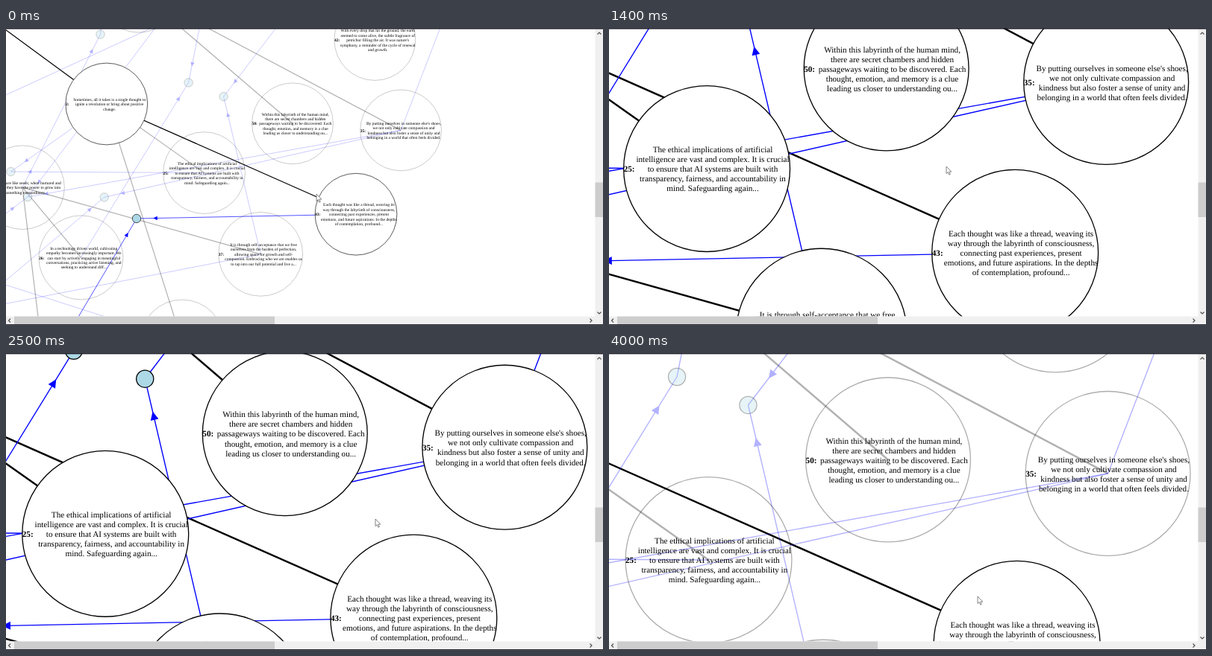
These frames come from a looping animation (800 px wide and 399 px high, 4100 ms). An HTML page:

```html
<!DOCTYPE html>
<html lang="en">
<head>
<meta charset="utf-8">
<title>Thought map</title>
<style>
  html, body { margin: 0; width: 100%; height: 100%; overflow: hidden; background: #fff; }
  svg { display: block; width: 800px; height: 399px; }
  text { font: 5.5px "Liberation Serif", "Times New Roman", serif; text-rendering: geometricPrecision; text-anchor: middle; }
  .label { font-weight: bold; text-anchor: start; }
  .tree { stroke: #000; stroke-width: 1.2; }
  .link { stroke: #00f; stroke-width: .68; fill: #00f; }
  .link polygon { stroke: none; }
  .big { fill: #fff; stroke: #000; stroke-width: .65; }
  .hub { fill: lightblue; stroke: #000; stroke-width: .65; }
  .dim .tree:not(.hot), .dim .link:not(.hot), .dim .hub:not(.hot) { opacity: .3; }
  .dim .big:not(.hot) { fill-opacity: 0; stroke-opacity: .32; }
</style>
</head>
<body>
<svg viewBox="0 0 800 399">
  <defs><clipPath id="view"><rect width="789.5" height="386.5" y="1"/></clipPath></defs>
  <rect width="800" height="399" fill="#fff"/>
  <g clip-path="url(#view)">
    <g id="world"><g id="edges"></g><g id="hubs"></g><g id="nodes"></g></g>
  </g>
  <g id="chrome">
    <path fill="#f0f0f0" d="M789.5 1H800V398H0V387.5H789.5Z"/>
    <path fill="#cdcdcd" d="M789.5 207.5H800V254H789.5ZM11 387.5H360V398H11Z"/>
    <path fill="none" stroke="#505050" stroke-width="1.2"
      d="M792.5 8.5l2.5-2.5 2.5 2.5M792.5 381.5l2.5 2.5 2.5-2.5M6 390.5l-2.5 2.5 2.5 2.5M782.5 390.5l2.5 2.5-2.5 2.5"/>
    <path fill="#25232d" d="M0 0H800V1.5H0ZM0 398H800V399H0Z"/>
  </g>
  <path id="cursor" d="M0 0V9.6L2.2 7.6 3.8 11.2 5.3 10.5 3.8 7.1H6.8Z" fill="#fff" stroke="#666" stroke-width=".8"/>
</svg>
<script>
const NS = 'http://www.w3.org/2000/svg';
const $ = id => document.getElementById(id);

function add(parent, tag, attrs, text) {
  const el = document.createElementNS(NS, tag);
  for (const k in attrs) el.setAttribute(k, attrs[k]);
  if (text) el.textContent = text;
  parent.append(el);
  return el;
}

// Big nodes: x, y, radius, text lines
const nodes = {
  2: [134.8, 102, 54.9, 'Sometimes, all it takes is a single thought to|ignite a revolution or bring about positive|change.'],
  7: [22, 214.2, 56.3, 'Thoughts are like seeds; when nurtured and|cared for, they have the power to grow into|something extraordinary.'],
  14: [178, -49, 55, ''],
  28: [236, 421, 56, ''],
  42: [494.3, 16, 54.4, "With every drop that hit the ground, the earth|seemed to come alive, the subtle fragrance of|petrichor filling the air. It was nature's|symphony, a reminder of the cycle of renewal|and growth."],
  25: [265.5, 194.6, 54.9, 'The ethical implications of artificial|intelligence are vast and complex. It is crucial|to ensure that AI systems are built with|transparency, fairness, and accountability in|mind. Safeguarding again...'],
  26: [100.4, 308.4, 56.5, 'In a technology driven world, cultivating|empathy becomes increasingly important. We|can start by actively engaging in meaningful|conversations, practicing active listening, and|seeking to understand diff...'],
  35: [529.1, 137.4, 54.4, "By putting ourselves in someone else's shoes,|we not only cultivate compassion and|kindness but also foster a sense of unity and|belonging in a world that often feels divided."],
  37: [341.2, 303.8, 56.4, 'It is through self-acceptance that we free|ourselves from the burden of perfection,|allowing space for growth and self-|compassion. Embracing who we are enables us|to tap into our full potential and live a...'],
  43: [469, 250.2, 54.9, 'Each thought was like a thread, weaving its|way through the labyrinth of consciousness,|connecting past experiences, present|emotions, and future aspirations. In the depths|of contemplation, profound...'],
  50: [384, 128.3, 54.4, 'Within this labyrinth of the human mind,|there are secret chambers and hidden|passageways waiting to be discovered. Each|thought, emotion, and memory is a clue|leading us closer to understanding ou...']
};

const hubs = {
  A: [175, 256], B: [131.7, 227.4], C: [244.6, 73.4], D: [291.6, 92.1],
  E: [126.5, 8.5], F: [29, 227], G: [6.5, 193]
};

// Edges join node keys or loose points outside the view
const tree = [
  [[-100, -71], 2, 'hot'], [2, 43, 'hot'], [2, 25], [2, 28], [7, 37], [7, 26],
  [7, [50, 446]], [14, 50], [14, 35]
];
const links = [
  [43, 'A', 'hot'], [[40, 484.5], 'A', 'hot'], [26, 'C'], [[280, -105], 'C'],
  [37, 'D'], [[400, -50], 'D'], [35, 'B'], [35, 'F'], [25, 'G'], [2, 'G'],
  [7, 'E'], [[133, -60], 'E'], [[230, -40], 'F'], [[-60, 295], 'F'], [[-40, 373], 'B'],
  [[-60, 117.6], [260, -30]], [35, [601, -50]], [37, [-60, 382]], [28, [-60, 326]]
];

const at = p => Array.isArray(p) ? p : nodes[p] || hubs[p];

function edge([from, to, hot = ''], kind) {
  const [x1, y1] = at(from), [x2, y2] = at(to);
  const g = add($('edges'), 'g', { class: `${kind} ${hot}` });
  add(g, 'line', { x1, y1, x2, y2 });
  if (kind === 'link' && to in hubs) {
    const a = Math.atan2(y2 - y1, x2 - x1);
    add(g, 'polygon', {
      points: '2.8,0 -2.8,2.7 -2.8,-2.7',
      transform: `translate(${x2 - 25 * Math.cos(a)} ${y2 - 25 * Math.sin(a)}) rotate(${a * 180 / Math.PI})`
    });
  }
}

tree.forEach(e => edge(e, 'tree'));
links.forEach(e => edge(e, 'link'));

for (const k in hubs) {
  const [cx, cy] = hubs[k];
  add($('hubs'), 'circle', { cx, cy, r: 5.7, class: k === 'A' ? 'hub hot' : 'hub' });
}

for (const k in nodes) {
  const [cx, cy, r, body] = nodes[k];
  add($('nodes'), 'circle', { cx, cy, r, class: k === '2' || k === '43' ? 'big hot' : 'big' });
  if (!body) continue;
  const base = cy + 2.1, lines = body.split('|');
  add($('nodes'), 'text', { x: cx - r, y: base, class: 'label' }, k + ':');
  lines.forEach((line, i) =>
    add($('nodes'), 'text', { x: cx + 3.9, y: base + (i - (lines.length - 1) / 2) * 6.45 }, line));
}

// Tracks: time followed by values
const LOOP = 4100, STEP = 100, FOCUS = [396, 200];
const zoomTrack = [[600, 0], [700, .0667], [1200, .708]];
const panTrack = [[1700, 0, 0], [2300, 3.4, 37.5], [2700, .9, 70], [3000, 2.4, 89]];
const cursorTrack = [
  [0, 416, 223], [600, 396, 200], [1200, 396, 200], [1400, 452, 186], [1700, 493, 170],
  [2300, 496, 207], [2700, 494, 239], [3000, 495, 256], [3100, 495, 252], [4000, 494, 327]
];

function sample(track, t) {
  const i = track.findIndex(k => k[0] > t);
  if (i === 0) return track[0].slice(1);
  if (i < 0) return track[track.length - 1].slice(1);
  const a = track[i - 1], b = track[i], u = (t - a[0]) / (b[0] - a[0]);
  return a.slice(1).map((v, j) => v + (b[j + 1] - v) * u);
}

function draw(t) {
  const s = Math.exp(sample(zoomTrack, t)[0]);
  const [px, py] = sample(panTrack, t);
  const x = FOCUS[0] * (1 - s) + px, y = FOCUS[1] * (1 - s) + py;
  $('world').setAttribute('transform', `translate(${x} ${y}) scale(${s})`);
  $('world').setAttribute('class', t < 200 || t >= 3700 ? 'dim' : '');
  $('cursor').setAttribute('transform', `translate(${sample(cursorTrack, t)})`);
}

const start = performance.now();
function tick() {
  const t = (performance.now() - start) % LOOP;
  draw(Math.floor(t / STEP) * STEP);
  requestAnimationFrame(tick);
}
tick();
</script>
</body>
</html>
```
